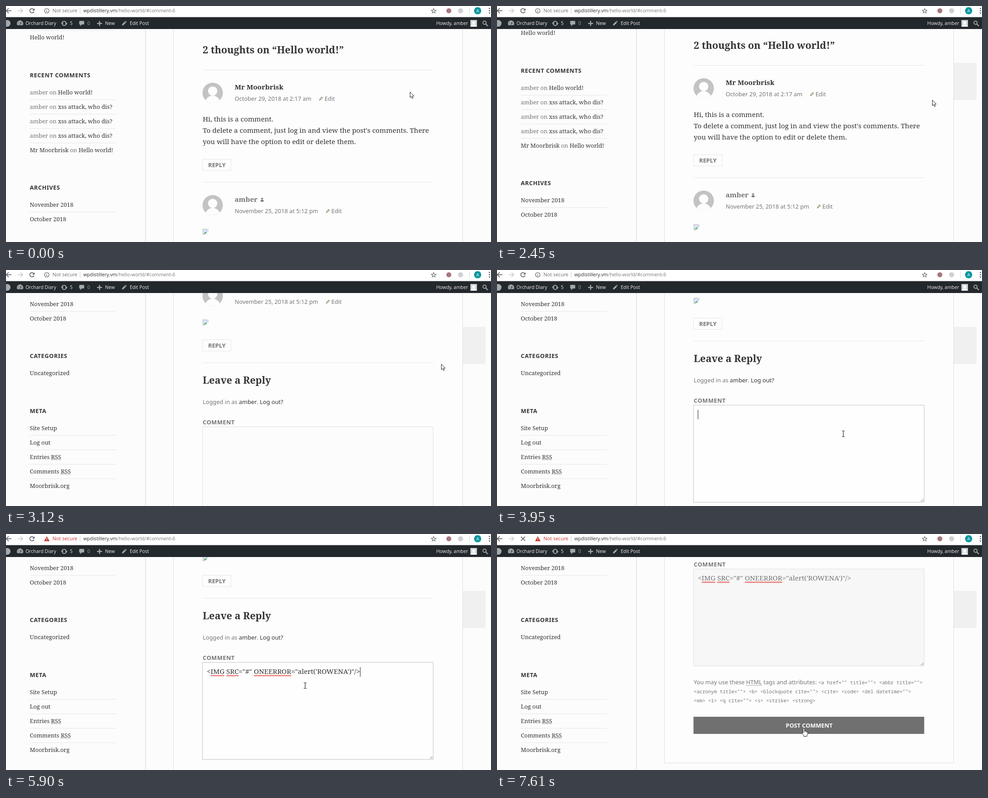
Recreate the animation shown at these times as an HTML page with a canvas. Size 1070x523 px, loop 8000 ms.

```html
<!DOCTYPE html>
<html lang="en">
<head>
<meta charset="utf-8">
<title>Comment form</title>
<style>
html, body { margin: 0; width: 100%; height: 100%; overflow: hidden; background: #fcfcfc; }
canvas { display: block; width: 1070px; height: 523px; }
</style>
</head>
<body>
<canvas id="stage"></canvas>
<script>
const W = 1070, H = 523, LOOP = 8000;
const canvas = document.getElementById('stage');
const g = canvas.getContext('2d');
const dpr = window.devicePixelRatio || 1;
canvas.width = W * dpr;
canvas.height = H * dpr;

const SERIF = '"Noto Serif", serif', SANS = '"Noto Sans", sans-serif';
const UI = '"Open Sans", sans-serif', MONO = '"Noto Sans Mono", monospace';
const side = '12.8px ' + SERIF, body = '15.2px ' + SERIF;
const bold = 'bold 12.8px ' + SANS, meta = '12.8px ' + SANS;
const code = '10.667px ' + MONO, bar = '10.4px ' + UI;
const DARK = '#333', GREY = '#757575', LINE = '#e6e6e6';
const USER = 'amber', GUEST = 'Mr Moorbrisk';

// Stepped timelines: [time, value...]
const scrolls = [[0, 0], [2450, 10], [2600, 43], [2750, 232], [2870, 296], [3000, 342],
  [3120, 384], [3400, 425], [3550, 432], [5900, 447], [6020, 562], [6140, 654]];
const pointer = [[0, 'arrow', 891, 190], [120, 'arrow', 985, 152], [250, 'arrow', 1048, 126],
  [1860, 'arrow', 982, 192], [2010, 'arrow', 960, 208], [3550, 'arrow', 945, 232],
  [3680, 'beam', 830, 325], [3800, 'beam', 764, 363], [5350, 'beam', 705, 348],
  [5470, 'beam', 660, 336], [6450, 'beam', 664, 350], [6600, 'arrow', 676, 392],
  [6730, 'hand', 682, 437], [6880, 'hand', 679, 433], [7000, 'hand', 677, 431], [7160, 'hand', 677, 430]];
const caretOn = [[0, 0], [3950, 1], [4510, 0], [4790, 1], [5350, 0], [5900, 1], [6450, 0], [7000, 1], [7470, 0]];

function at(list, t) {
  let cur = list[0];
  for (const row of list) if (row[0] <= t) cur = row;
  return cur;
}

function text(s, x, y, font, color, spacing = 0, align = 'left') {
  g.font = font;
  g.fillStyle = color;
  g.textAlign = align;
  g.letterSpacing = spacing + 'px';
  g.fillText(s, x, y);
  const w = g.measureText(s).width;
  g.letterSpacing = '0px';
  return x + w;
}

// Draws [string, colour] runs one after another
function runs(list, x, y, font) {
  for (const [s, color] of list) x = text(s, x, y, font, color);
  return x;
}

function rect(x, y, w, h, color) {
  g.fillStyle = color;
  g.fillRect(x, y, w, h);
}

function disc(x, y, r, color) {
  g.fillStyle = color;
  g.beginPath();
  g.arc(x, y, r, 0, 7);
  g.fill();
}

function trace(points, close) {
  g.beginPath();
  for (let i = 0; i < points.length; i += 2) g.lineTo(points[i], points[i + 1]);
  if (close) g.closePath();
}

function stroke(points, color, width = 1, close = false) {
  trace(points, close);
  g.strokeStyle = color;
  g.lineWidth = width;
  g.stroke();
}

function fill(points, color) {
  trace(points, true);
  g.fillStyle = color;
  g.fill();
}

function arc(x, y, r, a, b, color, width) {
  g.beginPath();
  g.arc(x, y, r, a, b);
  g.strokeStyle = color;
  g.lineWidth = width;
  g.stroke();
}

function place(x, y, draw) {
  g.save();
  g.translate(x, y);
  draw();
  g.restore();
}

function frame(x, y, w, h, color) {
  g.strokeStyle = color;
  g.lineWidth = 1;
  g.strokeRect(x + .5, y + .5, w - 1, h - 1);
}

function dotted(x1, x2, y) {
  g.setLineDash([1, 1]);
  stroke([x1, y, x2, y], '#555');
  g.setLineDash([]);
}

function browserBar(t) {
  const ink = '#5a5d61';
  rect(0, 0, W, 24, '#fff');
  rect(0, 24, W, 1, '#b5b5b5');
  stroke([0, 10.5, 12, 10.5], ink, 1.6);
  stroke([6, 5, .6, 10.5, 6, 16], ink, 1.6);
  stroke([26, 10.5, 37, 10.5], '#c4c6c8', 1.5);
  stroke([32, 5.5, 37, 10.5, 32, 15.5], '#c4c6c8', 1.5);
  if (t < 7610) {
    arc(57.3, 10.5, 4.8, .3, 5.4, ink, 1.6);
    fill([63, 5, 63, 10, 58, 10], ink);
  } else {
    stroke([53, 6, 62, 15], ink, 1.7);
    stroke([62, 6, 53, 15], ink, 1.7);
  }
  const alarm = t >= 4790;
  if (alarm) {
    fill([90, 5, 96, 16, 84, 16], '#c9302c');
    rect(89.4, 8.5, 1.3, 4, '#fff');
    rect(89.4, 13.4, 1.3, 1.3, '#fff');
  } else {
    arc(90, 10.5, 5, 0, 7, ink, 1.2);
    rect(89.4, 9.7, 1.2, 3.8, ink);
    rect(89.4, 7.4, 1.2, 1.3, ink);
  }
  text('Not secure', 102.5, 14, '10.9px ' + UI, alarm ? '#c9302c' : '#686b6f');
  rect(163, 4, 1, 13, '#c9c9c9');
  runs([['wpdistillery.vm', '#2b2d30'], ['/hello-world/#comment-6', '#74777b']], 170.5, 14, '10.7px ' + UI);
  const star = [];
  for (let i = 0; i < 10; i++) {
    const r = i % 2 ? 2.4 : 5.4, a = i * Math.PI / 5 - Math.PI / 2;
    star.push(943.5 + r * Math.cos(a), 11 + r * Math.sin(a));
  }
  stroke(star, ink, 1.1, true);
  disc(977, 10.5, 5.5, '#a9767d');
  disc(1003, 10.5, 5.5, '#cfd0d1');
  rect(1022, 4, 1, 13, '#d5d5d5');
  disc(1040.5, 10.5, 8, '#0f97a0');
  text('A', 1040.5, 13.5, '9px ' + UI, '#fff', 0, 'center');
  for (const y of [5.5, 10.5, 15.5]) disc(1066.5, y, 1.4, ink);
}

function pencil(x, y, size, color, solid) {
  place(x, y, () => {
    g.rotate(Math.PI / 4);
    g.scale(size, size);
    const shape = [-1.6, -5.5, 1.6, -5.5, 1.6, 3, 0, 6, -1.6, 3];
    if (solid) {
      fill(shape, color);
      rect(-2, -3.8, 4, .8, '#23282d');
    } else stroke(shape, color, 1.1 / size, true);
  });
}

function adminBar() {
  const icon = '#a4a9ae', ink = '#f1f1f1', base = 42;
  rect(0, 25, W, 26, '#23282d');
  disc(2.5, 38.5, 7.5, icon);
  g.fillStyle = icon;
  g.beginPath();
  g.arc(31, 39, 7, Math.PI * .83, Math.PI * 2.17);
  g.closePath();
  g.fill();
  stroke([31, 41, 33.5, 35], '#23282d', 1.3);
  for (const [x, y] of [[27, 39], [28.5, 35.5], [35, 39]]) disc(x, y, .8, '#23282d');
  text('Orchard Diary', 43, base, bar, ink);
  arc(128.3, 38.5, 4.6, Math.PI * 1.1, Math.PI * 1.95, icon, 1.9);
  arc(128.3, 38.5, 4.6, Math.PI * .1, Math.PI * .95, icon, 1.9);
  fill([130, 38, 136, 38, 133, 42], icon);
  fill([121, 39, 127, 39, 124, 35], icon);
  text('5', 141, base, bar, ink);
  g.fillStyle = icon;
  g.beginPath();
  g.roundRect(161.5, 33, 11, 8, 1.5);
  g.fill();
  fill([163.5, 40, 168, 40, 163.5, 45], icon);
  text('0', 179.5, base, bar, '#a0a5aa');
  rect(201, 37.5, 11, 2.4, icon);
  rect(205.3, 33.2, 2.4, 11, icon);
  text('New', 218.5, base, bar, ink);
  pencil(260.5, 38.5, 1.15, icon, true);
  text('Edit Post', 273, base, bar, ink);
  text('Howdy, ' + USER, 1019.5, base, bar, ink, 0, 'right');
  rect(1024.5, 31, 14.5, 15, '#d5d5d5');
  disc(1031.7, 37, 3.2, '#fff');
  g.save();
  g.beginPath();
  g.rect(1025, 31, 14, 14.5);
  g.clip();
  disc(1031.7, 46, 5.5, '#fff');
  g.restore();
  arc(1055.8, 37, 3.6, 0, 7, icon, 1.8);
  stroke([1058.4, 39.8, 1063, 44.5], icon, 2.3);
}

function title(s, y) { text(s, 52.5, y, bold, DARK, .512); }
function under(y) { rect(52, y, 190.5, 1, LINE); }

function sidebar() {
  const x = 52.5, post = 'xss attack, who dis?', hello = 'Hello world!';
  under(54);
  text(hello, x, 74, side, DARK);
  title('RECENT COMMENTS', 158);
  [hello, post, post, post].forEach((name, i) => {
    runs([[USER + ' on ', GREY], [name, DARK]], x, 196 + 32 * i, side);
    under(207 + 32 * i);
  });
  runs([[GUEST, DARK], [' on ', GREY], [hello, DARK]], x, 324, side);
  title('ARCHIVES', 407);
  text('November 2018', x, 445, side, DARK);
  under(456);
  text('October 2018', x, 477, side, DARK);
  title('CATEGORIES', 560);
  text('Uncategorized', x, 598, side, DARK);
  title('META', 682);
  ['Site Setup', 'Log out', 'Entries ', 'Comments ', 'Moorbrisk.org'].forEach((name, i) => {
    const y = 720 + 32 * i, end = text(name, x, y, side, DARK);
    if (i === 2 || i === 3) dotted(end, text('RSS', end, y, side, DARK), y + 1.5);
    if (i < 4) under(y + 11);
  });
}

function avatar(x, y) {
  g.save();
  g.beginPath();
  g.arc(x, y, 22.5, 0, 7);
  g.clip();
  rect(x - 23, y - 23, 46, 46, '#c3c3c3');
  disc(x, y - 4, 10.3, '#fdfdfd');
  g.beginPath();
  g.ellipse(x, y + 25, 17.5, 19, 0, 0, 7);
  g.fill();
  g.restore();
}

function commentHead(y, name, date, color, owner) {
  avatar(456, y + 12.5);
  text(name, 504.5, y + 5, 'bold 15.2px ' + SERIF, color);
  if (owner) {
    disc(565, y - 2, 2, GREY);
    g.beginPath();
    g.roundRect(561.5, y + .8, 7, 4, 1.8);
    g.fill();
  }
  const x = text(date, 504.5, y + 30, meta, GREY);
  pencil(x + 21, y + 25.5, .72, '#8a7358');
  text('Edit', x + 29, y + 30, meta, GREY);
}

function replyButton(y) {
  frame(433, y, 64, 26, LINE);
  text('REPLY', 446, y + 18, bold, GREY);
}

function brokenImage(x, y) {
  place(x, y, () => {
    rect(0, 0, 13, 13, '#a5a5a5');
    rect(1, 1, 11, 11, '#fff');
    rect(2, 2, 9, 8, '#c3d6f5');
    disc(5, 5, 1.6, '#fff');
    fill([2, 11, 7, 6.5, 11, 11], '#4ca64c');
    stroke([4, 13.5, 13.5, 4.5], '#fdfdfd', 1.5);
    fill([13.5, 6, 13.5, 13.5, 6, 13.5], '#fdfdfd');
    fill([9, 0, 13, 0, 13, 4], '#d9d9d9');
  });
}

function squiggle(x1, x2, y) {
  const pts = [];
  for (let x = x1, i = 0; x <= x2; x += 1.5, i++) pts.push(x, y + (i % 2 ? 1.2 : -1));
  stroke(pts, '#e8504a', 1.1);
}

function textarea(t) {
  const focus = t >= 3950 && t < 7470, sent = t >= 7470;
  rect(433, 731, 510, 216, sent ? '#f7f7f7' : focus ? '#fefefe' : '#fcfcfc');
  frame(433, 731, 510, 216, focus ? '#c2c2c2' : '#e0e0e0');
  stroke([935, 945, 941, 939], '#777');
  stroke([938.5, 945, 941, 942.5], '#777');
  let x = 443;
  if (t >= 4790) {
    const color = sent ? GREY : DARK, y = 757;
    const parts = ['<', 'IMG', ' ', 'SRC', '="#" ', 'ONEERROR', '="alert(\'ROWENA\')"/>'];
    parts.forEach((s, i) => {
      const end = text(s, x, y, body, color);
      if (i % 2) squiggle(x, end, y + 3.8);
      x = end;
    });
  }
  if (at(caretOn, t)[1]) rect(Math.floor(x), 742, 1, 21, '#222');
}

function content(t) {
  const x = 434, hr = y => rect(433.5, y, 509, 1, LINE);
  rect(369, -20, 639, 1182, '#fdfdfd');
  text('2 thoughts on “Hello world!”', x, 105, 'bold 21.6px ' + SERIF, DARK);
  hr(141);
  commentHead(180, GUEST, 'October 29, 2018 at 2:17 am', DARK);
  ['Hi, this is a comment.',
    'To delete a comment, just log in and view the post\'s comments. There',
    'you will have the option to edit or delete them.'
  ].forEach((s, i) => text(s, x, 256 + 25 * i, body, DARK));
  replyButton(339);
  hr(390);
  commentHead(429, USER, 'November 25, 2018 at 5:12 pm', GREY, true);
  brokenImage(434, 494);
  replyButton(538);
  hr(589);
  text('Leave a Reply', x, 636, 'bold 21.6px ' + SERIF, DARK);
  runs([['Logged in as ', GREY], [USER, DARK], ['. ', GREY], ['Log out?', DARK]], x, 681, meta);
  text('COMMENT', x, 726, bold, GREY, .512);
  textarea(t);
  let end = text('You may use these ', x, 987, meta, GREY);
  const from = end;
  end = text('HTML', end, 987, meta, GREY);
  dotted(from, end, 989.5);
  end = text(' tags and attributes: ', end, 987, meta, GREY);
  text('<a href="" title=""> <abbr title="">', end, 987, code, GREY);
  text('<acronym title=""> <b> <blockquote cite=""> <cite> <code> <del datetime="">', x, 1007, code, GREY);
  text('<em> <i> <q cite=""> <s> <strike> <strong>', x, 1027, code, GREY);
  rect(433.5, 1059, 509, 38, t >= 6730 ? '#707070' : '#333');
  text('POST COMMENT', 688.7, 1083, bold, '#fff', 0, 'center');
  frame(369, -20, 639, 1182, '#dedede');
}

const cursors = {
  arrow() {
    const pts = [.5, .5, .5, 13, 3.3, 10.4, 5.2, 14.8, 7.2, 14, 5.3, 9.7, 9, 9.4];
    fill(pts, '#fff');
    stroke(pts, '#222', 1, true);
  },
  beam() {
    stroke([-3, -6.5, -.8, -6.5, 0, -5.5, .8, -6.5, 3, -6.5], '#222');
    stroke([-3, 6.5, -.8, 6.5, 0, 5.5, .8, 6.5, 3, 6.5], '#222');
    stroke([0, -6, 0, 6], '#222', 1.2);
  },
  hand() {
    g.beginPath();
    g.moveTo(-1.5, 10);
    g.lineTo(-1.5, 1.8);
    g.quadraticCurveTo(0, -.8, 1.5, 1.8);
    g.lineTo(1.5, 6.5);
    g.quadraticCurveTo(3, 5.2, 4.2, 7);
    g.quadraticCurveTo(5.6, 6, 6.6, 7.8);
    g.quadraticCurveTo(8.3, 7.2, 8.6, 9);
    g.quadraticCurveTo(9, 14, 6.8, 16);
    g.lineTo(6.8, 18.5);
    g.lineTo(-.2, 18.5);
    g.lineTo(-.2, 16.5);
    g.lineTo(-4.4, 11);
    g.quadraticCurveTo(-4.6, 8.6, -1.5, 11);
    g.closePath();
    g.fillStyle = '#fff';
    g.fill();
    g.strokeStyle = '#222';
    g.lineWidth = 1;
    g.stroke();
    for (const x of [1.5, 4.2, 6.6]) stroke([x, 7, x, 10], '#222', .8);
  }
};

function draw(t) {
  g.setTransform(dpr, 0, 0, dpr, 0, 0);
  rect(0, 0, W, H, '#fcfcfc');
  const y = at(scrolls, t)[1];
  if (t >= 250) rect(1008, 126, 50, t < 1860 ? 79 : 82, '#f0f0f0');
  rect(307, 51, 1.4, H, '#dedede');
  place(0, -Math.min(y, 365), sidebar);
  place(0, -y, () => content(t));
  browserBar(t);
  adminBar();
  const [, kind, px, py] = at(pointer, t);
  place(px, py, cursors[kind]);
}

const start = performance.now();
function tick() {
  draw((performance.now() - start) % LOOP);
  requestAnimationFrame(tick);
}
tick();
</script>
</body>
</html>
```
